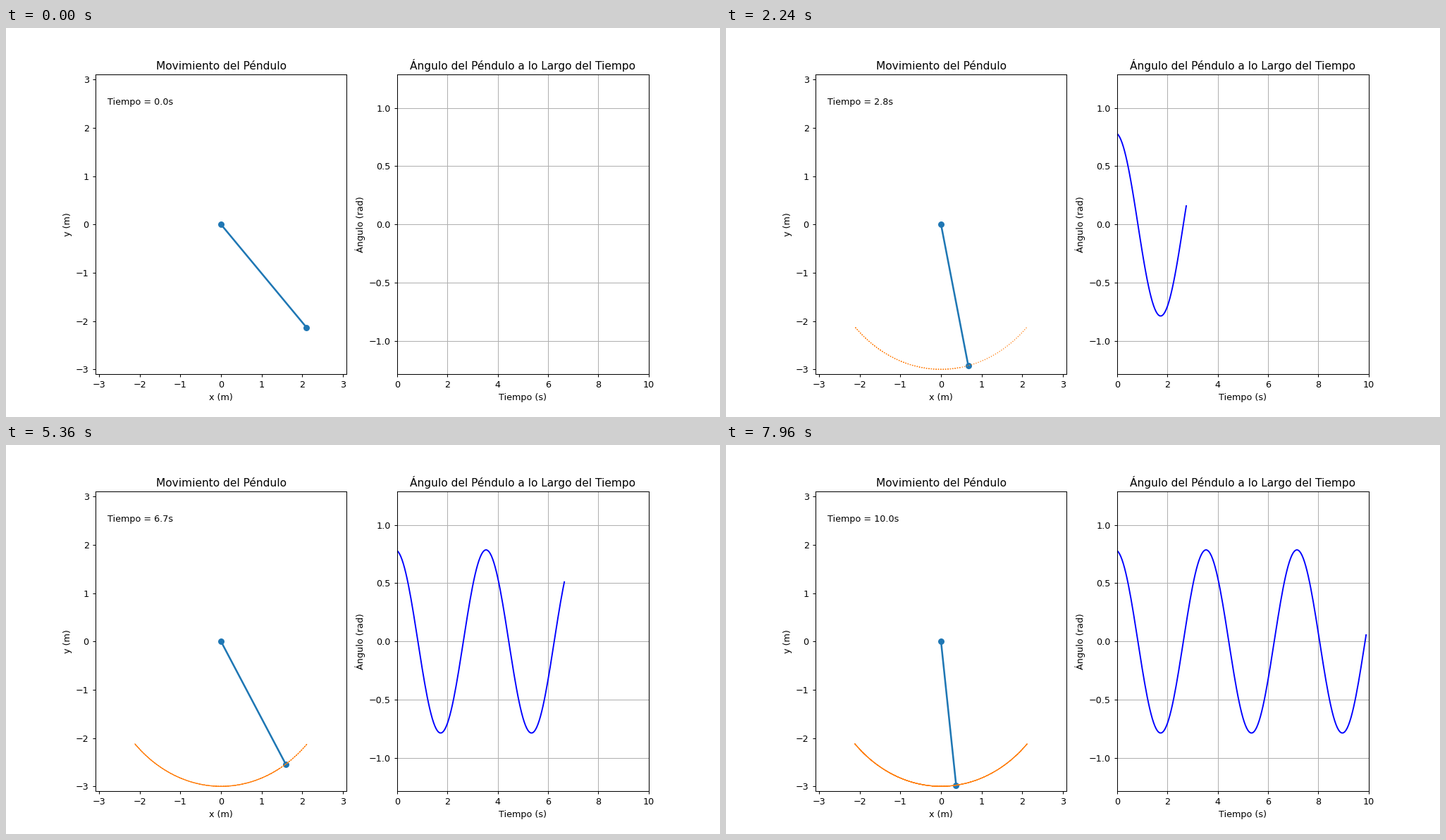
Write a matplotlib script that moves like this. It is 1013x553 px and loops after 8 s.

```python
import numpy as np
import matplotlib.pyplot as plt
from matplotlib.animation import FuncAnimation

WIDTH, HEIGHT, DPI = 1013, 553, 92
G, LENGTH, START = 9.81, 3.0, np.pi / 4
DT, STEPS = 0.05, 200


def swing():
    """Angles of the pendulum after each semi-implicit Euler step."""
    angle, speed, out = START, 0.0, []
    for _ in range(STEPS):
        speed -= G / LENGTH * np.sin(angle) * DT
        angle += speed * DT
        out.append(angle)
    return np.array(out)


theta = swing()
time = np.arange(STEPS) * DT
xs, ys = LENGTH * np.sin(theta), -LENGTH * np.cos(theta)

plt.rcParams["font.family"] = "DejaVu Sans"
# the small margin keeps the pixel size from being rounded down
size = ((WIDTH + 0.001) / DPI, (HEIGHT + 0.001) / DPI)
fig, (left, right) = plt.subplots(1, 2, figsize=size, dpi=DPI)

reach = LENGTH + 0.1
left.set(xlim=(-reach, reach), ylim=(-reach, reach),
         xlabel="x (m)", ylabel="y (m)", title="Movimiento del Péndulo")
rod, = left.plot([], [], "o-", lw=2, color="#1f77b4")
trail, = left.plot([], [], ":", lw=1, color="#ff7f0e")
label = left.text(0.05, 0.9, "", transform=left.transAxes)

right.set(xlim=(0, STEPS * DT), ylim=(-START - 0.5, START + 0.5),
          xlabel="Tiempo (s)", ylabel="Ángulo (rad)",
          title="Ángulo del Péndulo a lo Largo del Tiempo")
right.grid(True)
curve, = right.plot([], [], "b-", lw=1.5)


def update(i):
    rod.set_data([0, xs[i]], [0, ys[i]])
    trail.set_data(xs[:i], ys[:i])
    curve.set_data(time[:i], theta[:i])
    label.set_text(f"Tiempo = {i * DT:.1f}s")
    return rod, trail, curve, label


anim = FuncAnimation(fig, update, frames=STEPS, interval=40, repeat=True)
plt.show()
```
